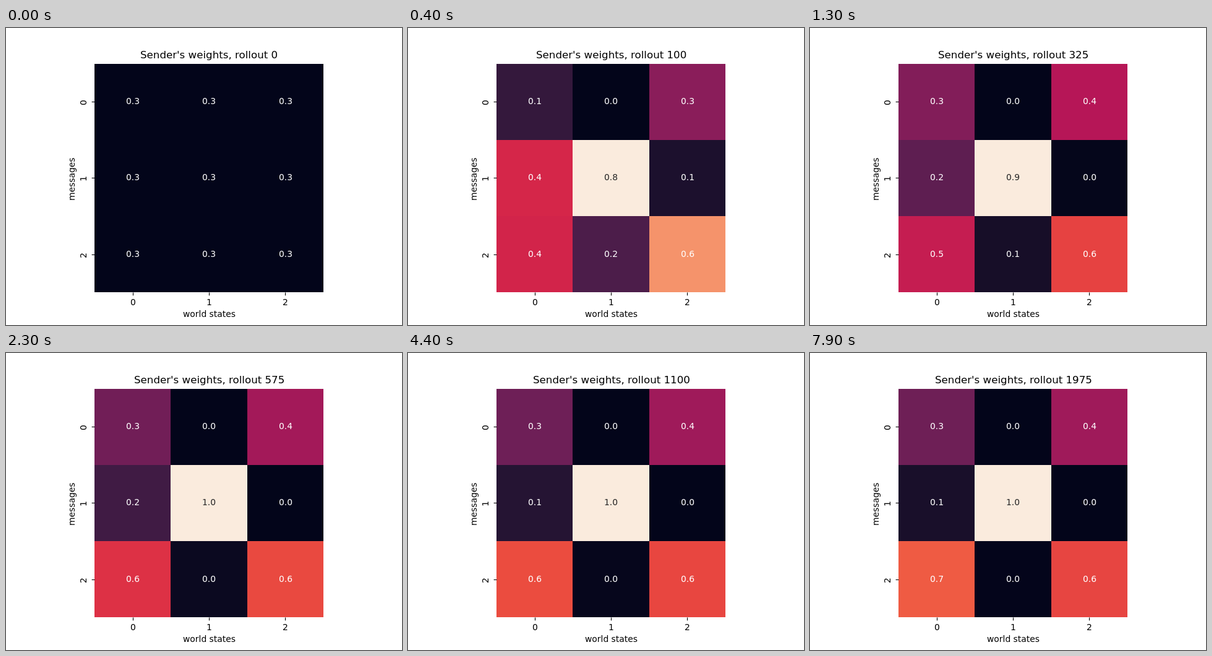
An HTML page with a canvas that plays this animation: 640x480 px, repeating every 8000 ms.

```html
<!DOCTYPE html>
<html lang="en">
<head>
<meta charset="utf-8">
<title>Sender's weights</title>
<style>
  html, body { margin: 0; width: 100%; height: 100%; overflow: hidden; background: #fff; }
  canvas { display: block; width: 640px; height: 480px; }
</style>
</head>
<body>
<canvas id="stage" width="640" height="480"></canvas>
<script>
const ctx = document.getElementById("stage").getContext("2d");

const STEP_MS = 100, STEPS = 80, ROLLOUTS_PER_STEP = 25;
const SMALL = 10 * 100 / 72, LARGE = 12 * 100 / 72;
const LEFT = 143.2, TOP = 57.6, CELL = 123.2;
const CENTER_X = LEFT + CELL * 1.5, CENTER_Y = TOP + CELL * 1.5;

// Dark to light colour ramp, evenly spaced stops
const RAMP = "03051a 221331 451c47 6a1f56 921c5b b91657 d92847 ed513e f47c56 f6a47b f7c9aa faebdd"
  .split(" ").map(h => [0, 2, 4].map(i => parseInt(h.slice(i, i + 2), 16)));

const mix = (a, b, k) => a + (b - a) * k;
const midX = i => LEFT + CELL * (i + .5);
const midY = i => TOP + CELL * (i + .5);

// Swings through two early values, then settles
function settle(t, early, late, end, tau) {
  if (t < 4) return mix(1 / 3, early, t / 4);
  if (t < 9) return mix(early, late, (t - 4) / 5);
  return mix(end, late, Math.exp((9 - t) / tau));
}

const fade = (t, tau) => Math.exp(-t / tau) / 3;

// Every column adds up to 1, so the last row follows from the others
function weightsAt(t) {
  const first = [settle(t, .136, .359, .28, 4), fade(t, 1.7), settle(t, .292, .48, .392, 4)];
  const second = [settle(t, .435, .264, .056, 22), 1 - 2 / 3 / (1 + t / 5.2) ** 2, fade(t, 3)];
  const third = first.map((w, i) => 1 - w - second[i]);
  return [first, second, third];
}

function rampColor(v) {
  const p = v * (RAMP.length - 1);
  const i = Math.min(Math.floor(p), RAMP.length - 2);
  return RAMP[i].map((c, n) => Math.round(mix(c, RAMP[i + 1][n], p - i)));
}

function luminance(rgb) {
  const [r, g, b] = rgb.map(c => {
    c /= 255;
    return c <= .03928 ? c / 12.92 : ((c + .055) / 1.055) ** 2.4;
  });
  return .2126 * r + .7152 * g + .0722 * b;
}

// Centred text whose start sits on a whole pixel
function label(text, x, y, { size = SMALL, color = "#000", turned = false } = {}) {
  ctx.save();
  ctx.font = `${size}px "DejaVu Sans", sans-serif`;
  ctx.textAlign = "left";
  ctx.textBaseline = "alphabetic";
  ctx.fillStyle = color;
  const half = ctx.measureText(text).width / 2;
  if (turned) {
    ctx.translate(x, Math.ceil(y + half) + 1);
    ctx.rotate(-Math.PI / 2);
  } else {
    ctx.translate(Math.ceil(x - half), y);
  }
  ctx.fillText(text, 0, 0);
  ctx.restore();
}

function line(x1, y1, x2, y2) {
  ctx.beginPath();
  ctx.moveTo(x1, y1);
  ctx.lineTo(x2, y2);
  ctx.stroke();
}

function drawCells(rows) {
  const all = rows.flat();
  const low = Math.min(...all);
  const range = Math.max(...all) - low;
  rows.forEach((cells, row) => cells.forEach((w, col) => {
    const rgb = rampColor(range > 1e-6 ? (w - low) / range : 0);
    const x = Math.round(LEFT + CELL * col), y = Math.round(TOP + CELL * row);
    ctx.fillStyle = `rgb(${rgb})`;
    ctx.fillRect(x, y,
      Math.round(LEFT + CELL * (col + 1)) - x, Math.round(TOP + CELL * (row + 1)) - y);
    label(Math.abs(w).toFixed(1), midX(col), Math.round(midY(row) + 4),
      { color: luminance(rgb) > .43 ? "#262626" : "#fff" });
  }));
}

function drawAxes() {
  ctx.strokeStyle = "#000";
  ctx.lineWidth = 1.11;
  for (let i = 0; i < 3; i++) {
    const x = Math.round(midX(i)) + .5, y = Math.round(midY(i)) + .5;
    line(x, 427.5, x, 432.4);
    line(138.6, y, 143.5, y);
    label(String(i), midX(i), 448);
    label(String(i), 130, midY(i), { turned: true });
  }
  label("world states", CENTER_X, 467);
  label("messages", 111, CENTER_Y, { turned: true });
}

function draw(step) {
  ctx.fillStyle = "#fff";
  ctx.fillRect(0, 0, 640, 480);
  drawCells(weightsAt(step));
  drawAxes();
  label(`Sender's weights, rollout ${step * ROLLOUTS_PER_STEP}`, CENTER_X, 49, { size: LARGE });
}

let start = null;
function tick(now) {
  if (start === null) start = now;
  draw(Math.floor((now - start) / STEP_MS + 1e-4) % STEPS);
  requestAnimationFrame(tick);
}
draw(0);
requestAnimationFrame(tick);
</script>
</body>
</html>
```
